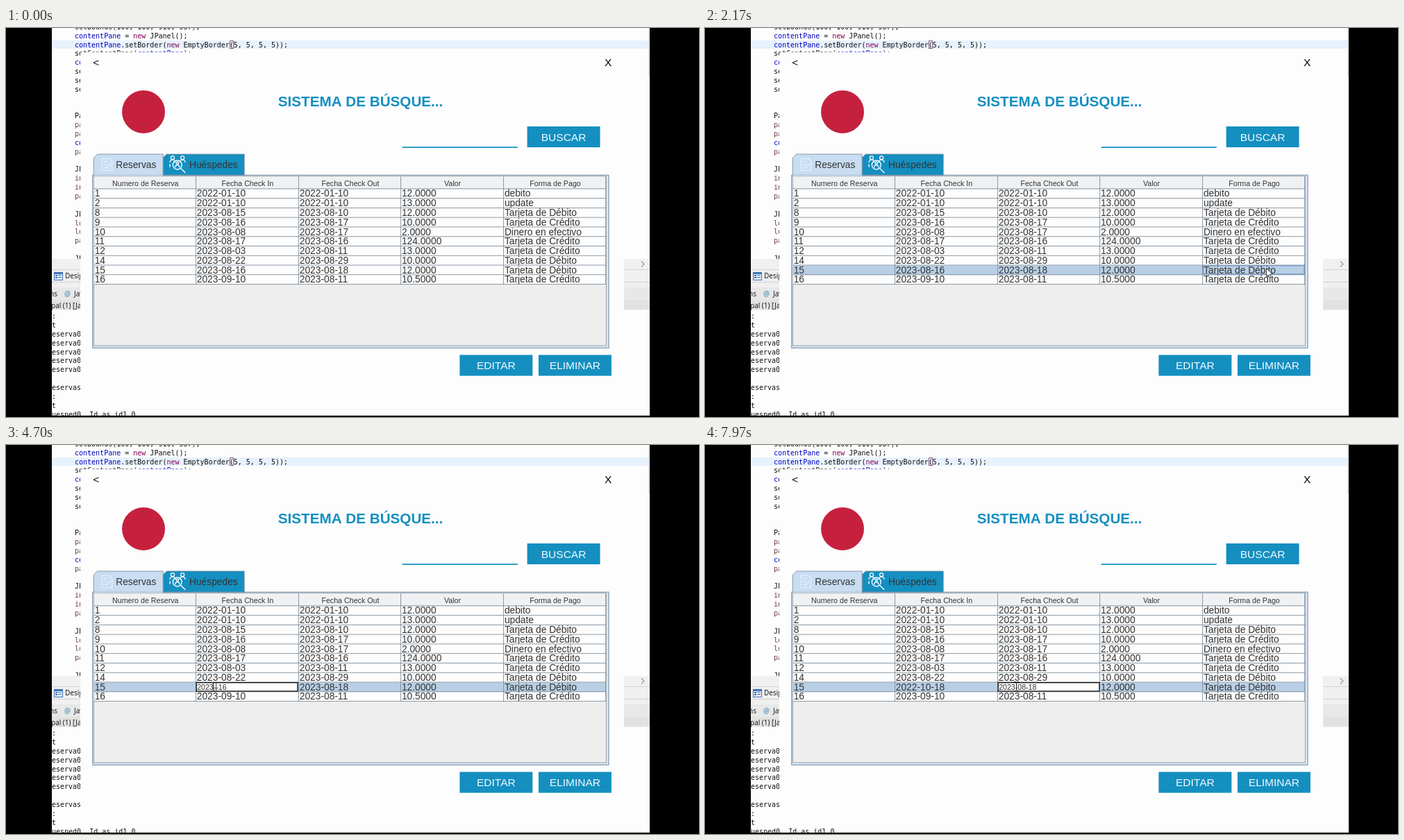
Recreate the animation shown at these times as an HTML page with a canvas. Size 998 by 561 pixels, loop 8000 ms.

```html
<!DOCTYPE html>
<html lang="es">
<head>
<meta charset="utf-8">
<style>
  html, body { margin: 0; width: 100%; height: 100%; overflow: hidden; background: #000; }
  canvas { display: block; }
</style>
</head>
<body>
<canvas id="stage" width="998" height="561"></canvas>
<script>
const ctx = document.getElementById('stage').getContext('2d');
const LOOP = 8000;
const SANS = '"Liberation Sans", Arial, sans-serif';
const MONO = '10px "DejaVu Sans Mono", monospace';
const UI = '10px "Open Sans", sans-serif';
const BLUE = '#148fc0', PAPER = '#fdfdfd', PANEL = '#eeeeee', GRID = '#7a8a99', PALE = '#c8ddf2', INK = '#333';
const FIELD = '#0000c0', KEYWORD = '#7f0055', LOCAL = '#6a3e3e', BLACK = '#111';

// The dialog is laid out in its own 910 x 571 pixels and shown reduced
const DIALOG = { x: 107, y: 34.4, scale: .8604 };

const COLUMNS = ['Numero de Reserva', 'Fecha Check In', 'Fecha Check Out', 'Valor', 'Forma de Pago'];
const DEBIT = 'Tarjeta de Débito', CREDIT = 'Tarjeta de Crédito';
const ROWS = [
  ['1', '2022-01-10', '2022-01-10', '12.0000', 'debito'],
  ['2', '2022-01-10', '2022-01-10', '13.0000', 'update'],
  ['8', '2023-08-15', '2023-08-10', '12.0000', DEBIT],
  ['9', '2023-08-16', '2023-08-17', '10.0000', CREDIT],
  ['10', '2023-08-08', '2023-08-17', '2.0000', 'Dinero en efectivo'],
  ['11', '2023-08-17', '2023-08-16', '124.0000', CREDIT],
  ['12', '2023-08-03', '2023-08-11', '13.0000', CREDIT],
  ['14', '2023-08-22', '2023-08-29', '10.0000', DEBIT],
  ['15', '2023-08-16', '2023-08-18', '12.0000', DEBIT],
  ['16', '2023-09-10', '2023-08-11', '10.5000', CREDIT]
];
const ACTIVE = 8, SELECT_AT = 1950, COMMIT_AT = 7100;
const TABLE_X = 23, TABLE_W = 857, HEAD_Y = 209, BODY_Y = 230, ROW_H = 16;
const colX = i => TABLE_X + Math.round(i * TABLE_W / 5);
const rowY = i => BODY_Y + i * ROW_H;

// Start time, column (-1 when no editor is open), text, caret index
const EDITS = [
  [2950, 1, '2023-08-16', 10], [3850, 1, '2023-08-16', 7],
  [4150, 1, '2023-0-16', 6], [4350, 1, '2023--16', 5],
  [5250, 1, '2023-1-16', 6], [5500, 1, '2023-10-16', 7],
  [6250, 1, '2023-10-16', 10], [6350, 1, '2023-10-1', 9],
  [6500, 1, '2023-10-18', 10], [6650, 1, '2023-10-18', 4],
  [6750, 1, '202-10-18', 3], [6880, 1, '2022-10-18', 4],
  [COMMIT_AT, -1], [7450, 2, '2023-08-18', 10]
];
// Pointer stops: time, x, y
const PATH = [
  [650, 345, 545], [1100, 308, 347], [1250, 308, 347], [1850, 808, 346],
  [2250, 808, 346], [2800, 295, 349], [3500, 295, 349], [3800, 298, 349],
  [5400, 298, 349], [5900, 296, 349], [6900, 296, 349], [7350, 448, 348]
];

function text(str, x, y, font, color = INK, align = 'left') {
  ctx.font = font;
  ctx.fillStyle = color;
  ctx.textAlign = align;
  ctx.fillText(str, x, y);
}
const sans = size => `${size}px ${SANS}`;

function box(x, y, w, h, color) {
  ctx.fillStyle = color;
  ctx.fillRect(x, y, w, h);
}

function frame(x, y, w, h, color, width = 1) {
  ctx.strokeStyle = color;
  ctx.lineWidth = width;
  ctx.strokeRect(x + width / 2, y + width / 2, w - width, h - width);
}

function shape(points, fill, stroke) {
  ctx.beginPath();
  points.forEach(([x, y]) => ctx.lineTo(x, y));
  ctx.closePath();
  ctx.fillStyle = fill;
  ctx.fill();
  ctx.strokeStyle = stroke;
  ctx.lineWidth = 1;
  ctx.stroke();
}

function strokePath(d, color, width = 1) {
  ctx.strokeStyle = color;
  ctx.lineWidth = width;
  ctx.stroke(new Path2D(d));
}

function clipped(x, y, w, h, draw) {
  ctx.save();
  ctx.beginPath();
  ctx.rect(x, y, w, h);
  ctx.clip();
  draw();
  ctx.restore();
}

function codeLine(line, parts) {
  let x = 99;
  for (const [str, color] of parts) {
    text(str, x, 14.7 + line * 12.85, MONO, color);
    x += str.length * 6.02;
  }
}

function drawEditor() {
  box(66, 0, 861, 559, PAPER);
  box(66, 18, 859, 12, '#e8f2fe');
  box(925, 0, 2, 70, '#dcdfe4');
  codeLine(-1, [['setBounds(100, 100, 910, 537);', BLACK]]);
  codeLine(0, [['contentPane', FIELD], [' = ', BLACK], ['new', KEYWORD], [' JPanel();', BLACK]]);
  codeLine(1, [['contentPane', FIELD], ['.setBorder(', BLACK], ['new', KEYWORD], [' EmptyBorder(5, 5, 5, 5));', BLACK]]);
  frame(322, 18, 6, 12, '#86607c');
  codeLine(2, [['setContentPane(', BLACK], ['contentPane', FIELD], [');', BLACK]]);
  const starts = { 3: 'co', 4: 'se', 5: 'se', 6: 'se', 9: 'Pa', 10: 'pa', 11: 'pa', 12: 'co', 13: 'pa',
    15: 'JL', 16: 'in', 17: 'in', 18: 'pa', 20: 'JL', 21: 'lo', 22: 'lo', 23: 'pa', 25: 'JP' };
  for (const [line, str] of Object.entries(starts)) {
    const color = str === 'co' ? FIELD : /pa|in|lo/.test(str) ? LOCAL : BLACK;
    codeLine(+line, [[str, color]]);
  }

  box(66, 333, 861, 74, '#f0f0f0');
  box(66, 348, 861, 1, '#d4d4d4');
  box(66, 366, 861, 1, '#d0d0d0');
  box(66, 374, 861, 18, '#e8e8e8');
  box(66, 392, 861, 14, '#e2e2e2');
  strokePath('M915 336.5l4 4-4 4', '#999', 1.2);
  box(69, 352, 13, 12, '#3f73b5');
  box(70, 355, 11, 8, '#e6f0fb');
  for (const y of [356, 359]) { box(71, y, 3, 2, '#3f73b5'); box(75, y, 5, 1, '#3f73b5'); }
  text('Design', 85, 361, UI, BLACK);
  text('ns', 63, 387, UI, BLACK);
  text('@', 84, 387, UI, '#2d7fb0');
  text('Javadoc', 98, 387, UI, BLACK);
  text('pal (1) [Java', 65, 404, UI, BLACK);

  const output = [':', 't', ...Array(5).fill('eserva0_'), '', 'eservas', ':', 't', 'uesped0_.Id as id1_0'];
  output.forEach((str, i) => text(str, 66, 418.7 + i * 12.95, MONO, BLACK));
}

function button(label, x, y) {
  box(x, y, 122, 35, BLUE);
  text(label, x + 61, y + 24, sans(18), '#f4fbff', 'center');
}

function person(x, y) {
  strokePath(`M${x - 3} ${y}a3 3 0 1 0 6 0a3 3 0 1 0-6 0M${x - 4.5} ${y + 8}q0-4.5 4.5-4.5t4.5 4.5`, '#f2faff', 1.5);
}

function tab(x, y, right, fill) {
  shape([[x, 206.5], [x, y + 6], [x + 6, y], [right, y], [right, 206.5]], fill, GRID);
}

function drawTabs() {
  tab(138.5, 171.5, 274.5, BLUE);
  tab(22.5, 171.5, 138.5, PALE);
  box(23, 206, 115, 2, PALE);
  strokePath('M36 179h13l4 4v16h-17zM39 184h8M39 189h6M39 194h5M44 195l7-8', '#e4effa', 1.6);
  text('Reservas', 59.5, 194.5, sans(16), INK);
  person(154.5, 177.5);
  person(171, 177.5);
  strokePath('M155 189.5a7.5 7.5 0 1 0 15 0a7.5 7.5 0 1 0-15 0M168 195l8 8M159 194q0-4.5 3.5-4.5t3.5 4.5M160.5 186.5a2 2 0 1 0 4 0a2 2 0 1 0-4 0M150 193v-5', '#f2faff', 1.7);
  text('Huéspedes', 182.5, 194.5, sans(16), INK);
}

function drawDialog() {
  box(0, 0, 910, 571, PAPER);
  text('<', 26.5, 24, sans(18), BLACK, 'center');
  text('X', 883.5, 24, sans(18), '#000', 'center');
  ctx.beginPath();
  ctx.arc(105.8, 100.6, 36, 0, Math.PI * 2);
  ctx.fillStyle = '#c5213f';
  ctx.fill();
  text('SISTEMA DE BÚSQUE...', 331, 91, 'bold ' + sans(24), BLUE);
  box(539, 159, 193, 2, BLUE);
  button('BUSCAR', 748, 125);
  button('EDITAR', 635, 508);
  button('ELIMINAR', 767, 508);

  box(20, 206, 865, 291, PALE);
  frame(20, 206, 865, 291, GRID);
  box(22, 208, 860, 286, '#fff');
  box(22, 208, 859, 285, PANEL);
  frame(22, 208, 859, 285, GRID);
  drawTabs();
}

function drawTable(time, edit) {
  const tableEnd = rowY(ROWS.length);
  const selected = time >= SELECT_AT;
  const y = rowY(ACTIVE);
  box(TABLE_X, HEAD_Y, TABLE_W, BODY_Y - HEAD_Y, '#f0f1f2');
  box(TABLE_X, BODY_Y, TABLE_W, tableEnd - BODY_Y, PAPER);
  if (selected) box(TABLE_X, y, TABLE_W, ROW_H, '#b8cfe5');
  for (let i = 0; i <= ROWS.length; i++) box(TABLE_X, rowY(i) - 1, TABLE_W, 1, GRID);
  for (let i = 1; i <= 5; i++) box(colX(i) - 1, HEAD_Y, 1, tableEnd - HEAD_Y, GRID);
  COLUMNS.forEach((name, c) => text(name, colX(c) + 86, 224.5, sans(12.4), INK, 'center'));

  ROWS.forEach((row, r) => row.forEach((value, c) => {
    if (r === ACTIVE && c === edit.col) return;
    if (r === ACTIVE && c === 1 && time >= COMMIT_AT) value = '2022-10-18';
    clipped(colX(c), rowY(r), 170, ROW_H - 1, () =>
      text(value, colX(c) + 1, rowY(r) + 13, sans(16)));
  }));

  if (selected && edit.col < 0) {
    const focus = time < EDITS[0][0] ? 4 : 1;
    frame(colX(focus), y, 170, ROW_H - 1, '#6382bf');
  }
  if (edit.col >= 0) drawCellEditor(edit, colX(edit.col), y);
}

function drawCellEditor({ value, caret, age }, x, y) {
  box(x, y, 170, ROW_H - 1, '#fff');
  frame(x - .5, y - .5, 171, ROW_H, '#111', 1.6);
  text(value, x + 1.5, y + 12, sans(12.3));
  if (age % 1000 < 500) {
    box(x + 1.5 + ctx.measureText(value.slice(0, caret)).width, y + 1, 1, 13, '#222');
  }
}

function editAt(time) {
  const step = EDITS.filter(([start]) => start <= time).pop();
  if (!step) return { col: -1 };
  const [start, col, value, caret] = step;
  return { col, value, caret, age: time - start };
}

function pointerAt(time) {
  const next = PATH.findIndex(([t]) => t > time);
  if (next === 0) return null;
  if (next < 0) return PATH[PATH.length - 1].slice(1);
  const [t0, x0, y0] = PATH[next - 1], [t1, x1, y1] = PATH[next];
  const u = (time - t0) / (t1 - t0), ease = u * u * (3 - 2 * u);
  return [x0 + (x1 - x0) * ease, y0 + (y1 - y0) * ease];
}

function drawPointer(time, editing) {
  const spot = pointerAt(time);
  if (!spot) return;
  ctx.save();
  ctx.translate(...spot);
  if (editing) {
    strokePath('M-2.5-6.5h2M1.5-6.5h2M.5-6v12M-2.5 6.5h2M1.5 6.5h2', '#222');
  } else {
    shape([[.5, .5], [.5, 12.5], [3.2, 10], [5, 14.5], [7, 13.6], [5.2, 9.3], [9, 9.3]], '#fff', '#444');
  }
  ctx.restore();
}

function render(now) {
  const time = now % LOOP;
  const edit = editAt(time);
  box(0, 0, 998, 561, '#000');
  clipped(66, 0, 861, 559, () => {
    drawEditor();
    ctx.save();
    ctx.translate(DIALOG.x, DIALOG.y);
    ctx.scale(DIALOG.scale, DIALOG.scale);
    clipped(0, 0, 910, 571, () => {
      drawDialog();
      drawTable(time, edit);
    });
    ctx.restore();
    drawPointer(time, edit.col >= 0);
  });
  requestAnimationFrame(render);
}
requestAnimationFrame(render);
</script>
</body>
</html>
```
